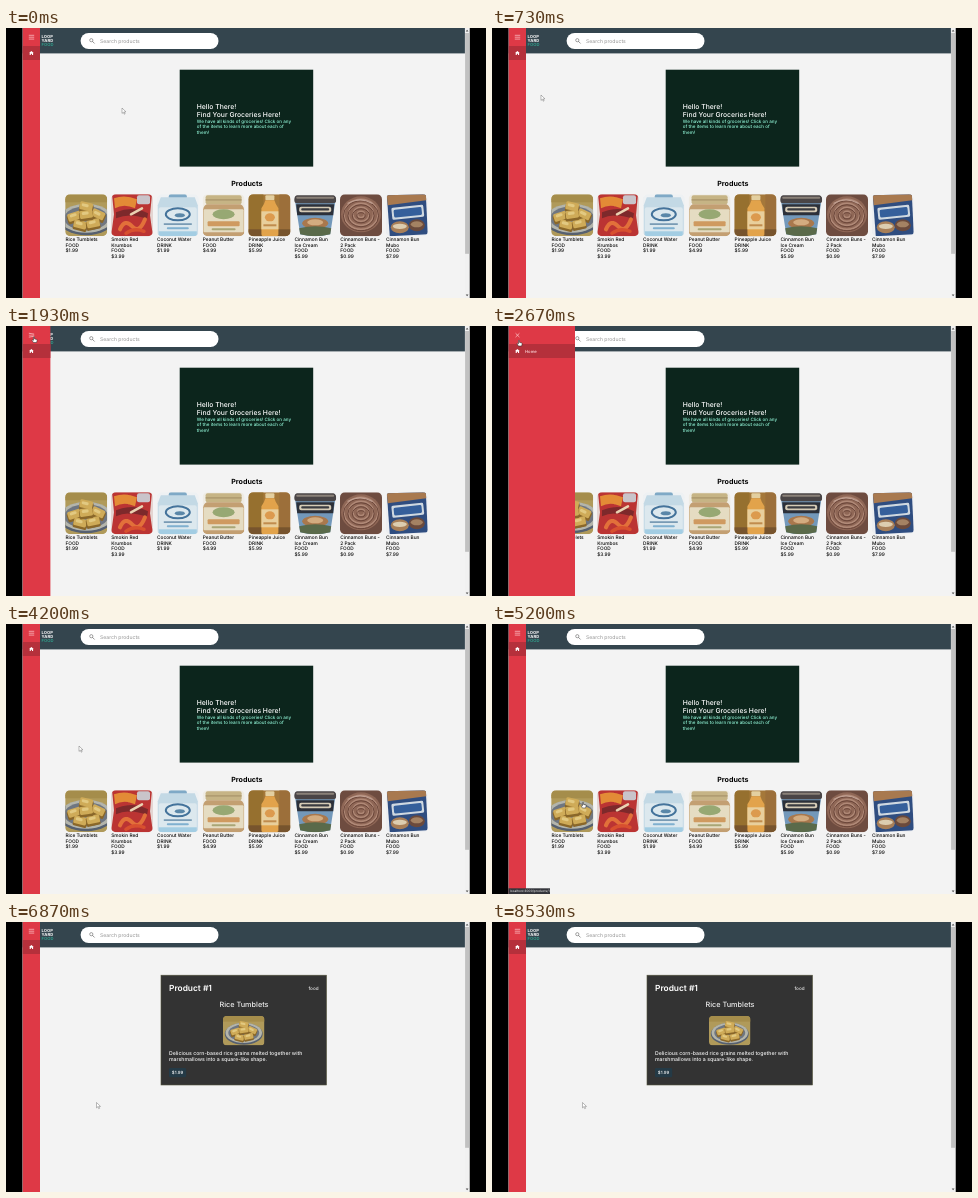
An HTML page for the animation above (9.19 s loop, 480 px wide and 270 px high).

```html
<!DOCTYPE html>
<html lang="en">
<head>
<meta charset="utf-8">
<title>Grocery store walkthrough</title>
<style>
  html, body { margin: 0; width: 100%; height: 100%; overflow: hidden; background: #000; }
  svg { display: block; }
  #stage { width: 100vw; height: 100vh; }
  text { font-family: Inter, "Open Sans", sans-serif; font-weight: 500; text-rendering: geometricPrecision; white-space: pre; }
</style>
</head>
<body>
<svg id="stage" viewBox="0 0 480 270" xmlns="http://www.w3.org/2000/svg">
  <defs>
    <clipPath id="screen"><rect x="16.5" width="447" height="270"/></clipPath>
    <clipPath id="square"><rect width="42" height="42" rx="5"/></clipPath>
    <clipPath id="wide"><rect width="41.5" height="29.5" rx="4"/></clipPath>
    <clipPath id="drawer"><rect id="drawerClip" x="16.5" width="17.5" height="270"/></clipPath>
  </defs>
  <g clip-path="url(#screen)">
    <rect x="16" width="448" height="270" fill="#f3f3f3"/>
    <g id="home"></g>
    <g id="detail"></g>
    <g id="header"></g>
    <g id="scrollbar">
      <rect x="458.9" width="5" height="270" fill="#f1f1f1"/>
      <rect x="459.1" y="5" width="4.1" height="220.8" fill="#c1c1c1"/>
      <path d="M459.7 3.6l1.4-1.8 1.4 1.8zM459.7 266.4l1.4 1.8 1.4-1.8z" fill="#505050"/>
    </g>
    <g clip-path="url(#drawer)">
      <rect x="16" width="68" height="270" fill="#de3946"/>
      <rect x="16" y="18" width="68" height="14" fill="#b5303b"/>
      <path d="M23.1 25.1l2.3-2.1 2.3 2.1h-.6v2h-1.1v-1.4h-1.2v1.4h-1.1v-2z" fill="#fff"/>
      <g id="homeLabel"></g>
      <g stroke="#ffd3d5" stroke-width=".65">
        <path id="barTop" d="M-2.7 0h5.4"/>
        <path id="barMid" d="M22.8 9.2h5.4"/>
        <path id="barLow" d="M-2.7 0h5.4"/>
      </g>
    </g>
    <g id="status">
      <rect x="16" y="264.3" width="42" height="5.7" fill="#34353b"/>
    </g>
    <path id="arrow" d="M0 0V5.4L1.3 4.2 2.2 6.2 3.1 5.8 2.2 3.9H4Z" fill="#fff" stroke="#555" stroke-width=".4"/>
    <path id="hand" d="M-.5.4Q0-.3.5.4V2.4L2.9 3Q3.2 3.2 3.1 4L2.6 6H-.6L-2 3.7Q-1.8 2.9-1 3.5L-.5 3.8Z" fill="#fff" stroke="#222" stroke-width=".5"/>
  </g>
</svg>
<script>
const LOOP = 9190, FPS = 15;
const $ = id => document.getElementById(id);

const text = (x, y, size, str, fill = '#000', more = '') =>
  `<text x="${x}" y="${y}" font-size="${size}" fill="${fill}" ${more}>${str}</text>`;
const box = (x, y, w, h, fill, r = 0) =>
  `<rect x="${x}" y="${y}" width="${w}" height="${h}" rx="${r}" fill="${fill}"/>`;
const oval = (x, y, rx, ry, fill, more = '') =>
  `<ellipse cx="${x}" cy="${y}" rx="${rx}" ry="${ry}" fill="${fill}" ${more}/>`;
const shape = (d, fill, more = '') => `<path d="${d}" fill="${fill}" ${more}/>`;
const line = (d, color, w) => shape(d, 'none', `stroke="${color}" stroke-width="${w}" stroke-linecap="round"`);
const tilted = (x, y, w, h, a, fill) =>
  `<g transform="translate(${x} ${y}) rotate(${a})">${box(-w / 2, -h / 2, w, h, fill, 1.5)}</g>`;

// Drawn on a 60 x 42 field so it can be cropped square or wide.
const plate = box(0, 0, 60, 42, '#b09a5a') + box(0, 0, 60, 8, '#a58d4b') +
  oval(30, 25.5, 27, 15.5, '#566070') + oval(30, 24, 26, 14.5, '#b4b5ab') + oval(30, 24, 22, 12, '#6f7681') +
  [[18, 22, -18], [30, 12, 12], [42, 20, 25], [24, 30, 14], [37, 29, -12], [30, 20, -8]].map(([x, y, a]) =>
    tilted(x, y + 2, 14, 9, a, '#8a6729') + tilted(x, y, 13, 8, a, '#cfab58') +
    tilted(x - 1, y - 1, 7, 3, a, '#e2c981')).join('');

const crisps = box(0, 0, 42, 42, '#e4d5d2') + shape('M1 0H41L39 21 42 42H0L3 20Z', '#bb3433') +
  box(26, 1, 13, 9, '#c9c4ca', 2) + shape('M3 4Q14 0 26 5L24 14Q13 9 4 14Z', '#e38b36') +
  shape('M5 18Q22 11 37 19L36 25Q20 18 5 24Z', '#7d292b') +
  line('M9 35Q14 24 21 32T34 25', '#e2703a', 4) + line('M15 39Q23 33 33 37', '#d8502f', 3.5) +
  line('M20 20L31 14', '#ead2b2', 2.5);

const carton = box(0, 0, 42, 42, '#eef1f3') + box(12, 0, 18, 5, '#7fa9c6', 2) +
  shape('M4 3H38L41 11V42H1V11Z', '#c3d9e5') + box(2, 13, 38, 28, '#dce8ee', 2) +
  oval(21, 20, 12, 6, 'none', 'stroke="#44739b" stroke-width="2"') +
  oval(23, 21, 5, 2, '#5a87a8') + box(7, 29, 28, 1.6, '#6f93af') + box(10, 33, 22, 2, '#7fb0cf', 1) +
  box(2, 37, 38, 5, '#a3cde3');

const jar = box(0, 0, 42, 42, '#efece4') + box(3, 1, 36, 9, '#c6b485', 2) + box(3, 5, 36, 1.2, '#a8946a') +
  shape('M4 10H38Q42 12 41.5 18V39Q41 42 37 42H5Q1 42 .5 39V18Q0 12 4 10Z', '#c39f72') +
  box(1, 15, 40, 23, '#e5dcc2', 1) + oval(21, 20, 11, 5, '#97a873') +
  box(5, 27, 32, 5, '#cf9a60', 1) + box(9, 34, 24, 2, '#a9a676', 1);

const bottle = box(0, 0, 42, 42, '#a5783a') + box(0, 0, 15, 42, '#96702f') + box(31, 0, 11, 42, '#9c6f3a') +
  box(0, 35, 42, 7, '#77542d') + box(17, 1, 9, 5, '#e3cfa0', 1) +
  shape('M17 6H26Q27 10 30 14V40Q30 42 27 42H15Q13 42 13 40V14Q16 10 17 6Z', '#e2a34b') +
  box(13, 17, 17, 18, '#e8cf9c') + oval(21.5, 23, 5, 4, '#dc9a4e') + box(15, 30, 13, 2, '#c08c4d');

const tub = box(0, 0, 42, 42, '#f3f3f3') + shape('M1 8H41L36 40Q21 44 6 40Z', '#7398ba') +
  box(0, 1, 42, 8, '#4a4546', 3) + box(2, 2.5, 38, 2, '#8a8178', 1) +
  shape('M2 10H40L39 21H3Z', '#2c3039') + box(5, 12.5, 32, 5.5, '#d5cbb6', 2) + box(7, 14, 28, 2.2, '#3a3b40', 1) +
  oval(21, 29, 13, 5.5, '#a9784d') + oval(21, 28, 8, 3, '#d3ac80') +
  shape('M5 34Q21 30 37 34L36 40Q21 44 6 40Z', '#5a6a4a');

const buns = box(0, 0, 42, 42, '#6e4c40') + oval(21, 20, 20, 18, '#8f6756') +
  [17, 12.5, 8, 3.5].map(r => oval(21, 20, r, r * .88, 'none', 'stroke="#b08977" stroke-width="1.5"') +
    oval(21, 21.5, r + .6, r * .88, 'none', 'stroke="#6b463a" stroke-width="1"')).join('') +
  line('M8 9Q20 2 32 9', '#c0a092', 1.2);

const cookies = box(0, 0, 42, 42, '#eceef1') + shape('M1 1L40 0 42 40 4 42Z', '#2f4d80') +
  shape('M1 1L40 0 40.5 6 2 11Z', '#a8794f') + tilted(22, 18, 32, 12, -6, '#cfd8e0') +
  tilted(22, 18, 28, 8, -6, '#355f9b') + oval(14, 33, 9, 6, '#a87f58') + oval(14, 32, 7, 2.6, '#dccdb0') +
  oval(31, 31, 8, 6, '#6b4a3c') + oval(31, 30, 6, 3, '#a48263');

const photo = (art, w, h, clip, vb = '0 0 42 42') =>
  `<g clip-path="url(#${clip})"><svg width="${w}" height="${h}" viewBox="${vb}" preserveAspectRatio="xMidYMid slice">${art}</svg></g>`;

const products = [
  [plate, 'Rice Tumblets', 'FOOD', '$1.99'],
  [crisps, 'Smokin Red', 'Krumbos', 'FOOD', '$3.99'],
  [carton, 'Coconut Water', 'DRINK', '$1.99'],
  [jar, 'Peanut Butter', 'FOOD', '$4.99'],
  [bottle, 'Pineapple Juice', 'DRINK', '$5.99'],
  [tub, 'Cinnamon Bun', 'Ice Cream', 'FOOD', '$5.99'],
  [buns, 'Cinnamon Buns -', '2 Pack', 'FOOD', '$0.99'],
  [cookies, 'Cinnamon Bun', 'Mubo', 'FOOD', '$7.99']
];

$('home').innerHTML = box(173.7, 41.7, 133.5, 96.9, '#0c251c') +
  text(190.8, 80.8, 6.8, 'Hello There!', '#fff') +
  text(190.8, 88.7, 6.8, 'Find Your Groceries Here!', '#fff') +
  ['We have all kinds of groceries! Click on any', 'of the items to learn more about each of', 'them!']
    .map((s, i) => text(190.8, 94.8 + i * 5.35, 4.55, s, '#93f8da')).join('') +
  text(240.9, 157.8, 7.1, 'Products', '#000', 'style="font-weight:700" text-anchor="middle"') +
  products.map(([art, ...lines], i) => {
    const x = 59.2 + i * 45.8;
    return `<g transform="translate(${x} 166.3)">${photo(art, 42, 42, 'square', i ? undefined : '0 0 60 42')}</g>` +
      lines.map((s, n) => text(x + .2, 213.2 + n * 5.45, 4.8, s)).join('');
  }).join('');

$('detail').innerHTML =
  '<rect x="155" y="53.2" width="165.5" height="109.8" fill="#333" stroke="#55553d" stroke-width=".6"/>' +
  text(163, 69.2, 8.4, 'Product #1', '#fff', 'style="font-weight:600"') +
  text(312.5, 67.8, 4.6, 'food', '#eee', 'text-anchor="end"') +
  text(238, 85.2, 7.3, 'Rice Tumblets', '#eee', 'text-anchor="middle"') +
  `<g transform="translate(217 94)">${photo(plate, 41.5, 29.5, 'wide', '0 0 60 42')}</g>` +
  text(163, 132.9, 5.2, 'Delicious corn-based rice grains melted together with', '#f5f5f5') +
  text(163, 139.1, 5.2, 'marshmallows into a square-like shape.', '#f5f5f5') +
  box(163, 146, 17.2, 9.2, '#243a46', 1.2) + text(171.6, 152.2, 4.4, '$1.99', '#fff', 'text-anchor="middle"');

$('header').innerHTML = box(16, 0, 443, 25.4, '#34454e') +
  ['LOOP', 'YARD', 'FOOD'].map((s, i) =>
    text(35.6, 10.2 + i * 3.75, 4.2, s, i < 2 ? '#fff' : '#31b59b', `style="font-weight:${i < 2 ? 700 : 500}"`)).join('') +
  box(74.6, 4.9, 137.9, 16.2, '#fff', 8.1) +
  '<circle cx="85.3" cy="12.2" r="1.6" fill="none" stroke="#666" stroke-width=".6"/>' +
  line('M86.6 13.5l1.7 1.7', '#666', .7) + text(94, 14.8, 5.1, 'Search products', '#949494', 'style="font-weight:400"');

$('homeLabel').innerHTML = text(33, 26.7, 4.2, 'Home', '#ffdfe0');
$('status').innerHTML += text(18, 268.3, 3.15, 'localhost:3000/products/1', '#dcdcdc');

const clamp = v => Math.min(1, Math.max(0, v));
const smooth = v => v * v * (3 - 2 * v);
const bezier = (a, b, s) => 3 * a * s * (1 - s) ** 2 + 3 * b * s * s * (1 - s) + s ** 3;

// The CSS "ease" curve, solved by bisection.
function ease(x) {
  let lo = 0, hi = 1;
  for (let i = 0; i < 24; i++) {
    const mid = (lo + hi) / 2;
    if (bezier(.25, .25, mid) < x) lo = mid; else hi = mid;
  }
  return bezier(.1, 1, lo);
}

const path = [
  [0, 116, 80], [60, 116, 80], [333, 49, 67], [733, 49, 67], [1400, 26, 11], [1933, 28, 10.5],
  [2530, 27, 14], [3330, 27, 14], [3800, 73, 122], [4200, 73, 122], [4867, 91, 178],
  [6600, 91, 178], [6867, 90.5, 180.5], [LOOP, 90.5, 180.5]
];

function pointer(t) {
  const i = Math.max(1, path.findIndex(k => k[0] >= t));
  const [t0, x0, y0] = path[i - 1], [t1, x1, y1] = path[i];
  const p = smooth(clamp((t - t0) / (t1 - t0)));
  return [x0 + (x1 - x0) * p, y0 + (y1 - y0) * p];
}

const show = (id, on) => $(id).setAttribute('display', on ? 'inline' : 'none');
const move = (id, x, y, a = 0) => $(id).setAttribute('transform', `translate(${x} ${y}) rotate(${a})`);

function draw(ms) {
  const t = Math.floor((ms + 4) * FPS / 1000) * 1000 / FPS;
  const onDetail = t >= 6460;
  show('home', !onDetail);
  show('detail', onDetail);
  show('status', t >= 4995 && t < 6660);

  const open = ease(clamp((t - 1852) / 500)) - ease(clamp((t - 2740) / 500));
  $('drawerClip').setAttribute('width', 17.5 + 49 * open);
  $('homeLabel').setAttribute('opacity', clamp(open * 2 - 1));
  const gap = 1.9 * (1 - open);
  move('barTop', 25.5, 9.2 - gap, 45 * open);
  move('barLow', 25.5, 9.2 + gap, -45 * open);
  $('barMid').setAttribute('opacity', 1 - open);

  const [x, y] = pointer(t);
  const overMenu = x < 30 && y < 19;
  const overCard = !onDetail && y > 166;
  show('hand', overMenu || overCard);
  show('arrow', !overMenu && !overCard);
  move('hand', x, y);
  move('arrow', x, y);
}

const start = performance.now();
function tick() {
  draw((performance.now() - start) % LOOP);
  requestAnimationFrame(tick);
}
tick();
</script>
</body>
</html>
```
